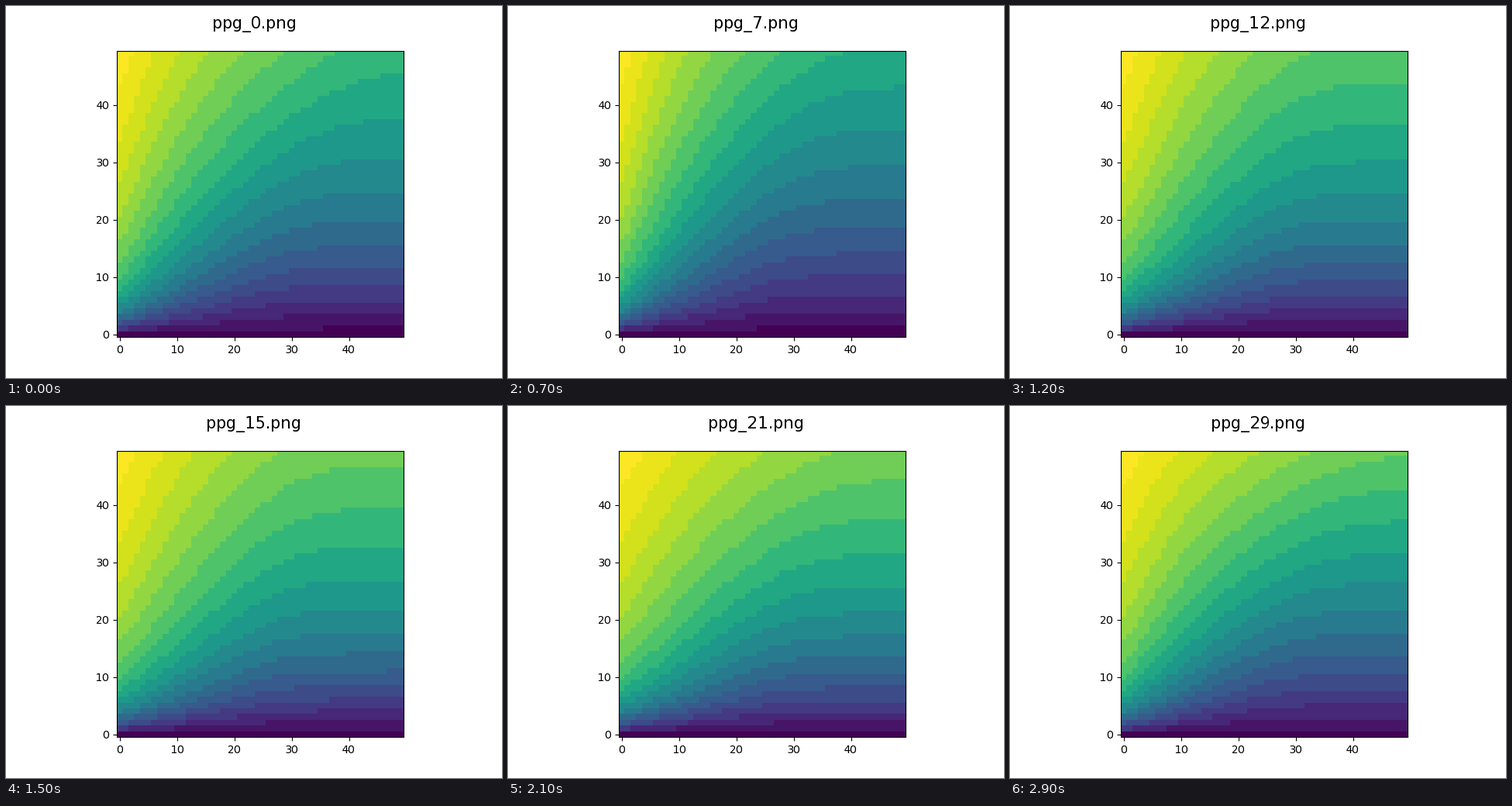
Write a matplotlib script that moves like this. It is 640x480 px and loops after 3 s.

```python
import numpy as np
import matplotlib.pyplot as plt
from matplotlib.animation import FuncAnimation

SIZE = 50
FRAMES = 30
STEP_MS = 100
BASE = 6.3

# Colour steps: nearly even, a little wider around the greens
s = np.linspace(0, 1, 19)
LEVELS = s + 0.062 * np.sin(np.pi * s ** 2.5)
EDGES = (LEVELS[1:] + LEVELS[:-1]) / 2

y, x = np.mgrid[0:SIZE, 0:SIZE].astype(float)
top = SIZE - 1
rise = (y / top) ** 2


def surface(i):
    """Saturating growth in y, inhibited by x, in discrete colour steps."""
    away = (i - 4.7 + FRAMES / 2) % FRAMES - FRAMES / 2
    strength = 21.5 + 25 * np.exp(-(away / 5.6) ** 2)
    taper = 0.1 + 0.01 * i
    spread = 10.5 + 5.5 * np.cos(2 * np.pi * (i - 28) / FRAMES)

    p = (x / (28 + spread * rise)) ** 1.2
    inhibition = p / (1 + p ** 7) ** (1 / 7)
    k = BASE + strength * (1 - taper * rise) * inhibition
    value = y / (y + k) * (top + BASE) / top
    return LEVELS[np.digitize(value, EDGES)]


plt.rcParams["font.family"] = "DejaVu Sans"
plt.rcParams["text.hinting_factor"] = 1  # whole-pixel letter spacing

fig, ax = plt.subplots(figsize=(6.4, 4.8), dpi=100)
image = ax.imshow(surface(0), origin="lower", cmap="viridis",
                  vmin=0, vmax=1, interpolation="nearest")
ax.set_xticks(range(0, SIZE, 10))
ax.set_yticks(range(0, SIZE, 10))
title = fig.text(0.5, 1 - 29 / 480, "ppg_0.png", fontsize=15,
                 ha="center", va="baseline")


def update(i):
    image.set_data(surface(i))
    title.set_text(f"ppg_{i}.png")
    return image, title


anim = FuncAnimation(fig, update, frames=FRAMES, interval=STEP_MS,
                     repeat=True, repeat_delay=0, blit=False)
plt.show()
```
